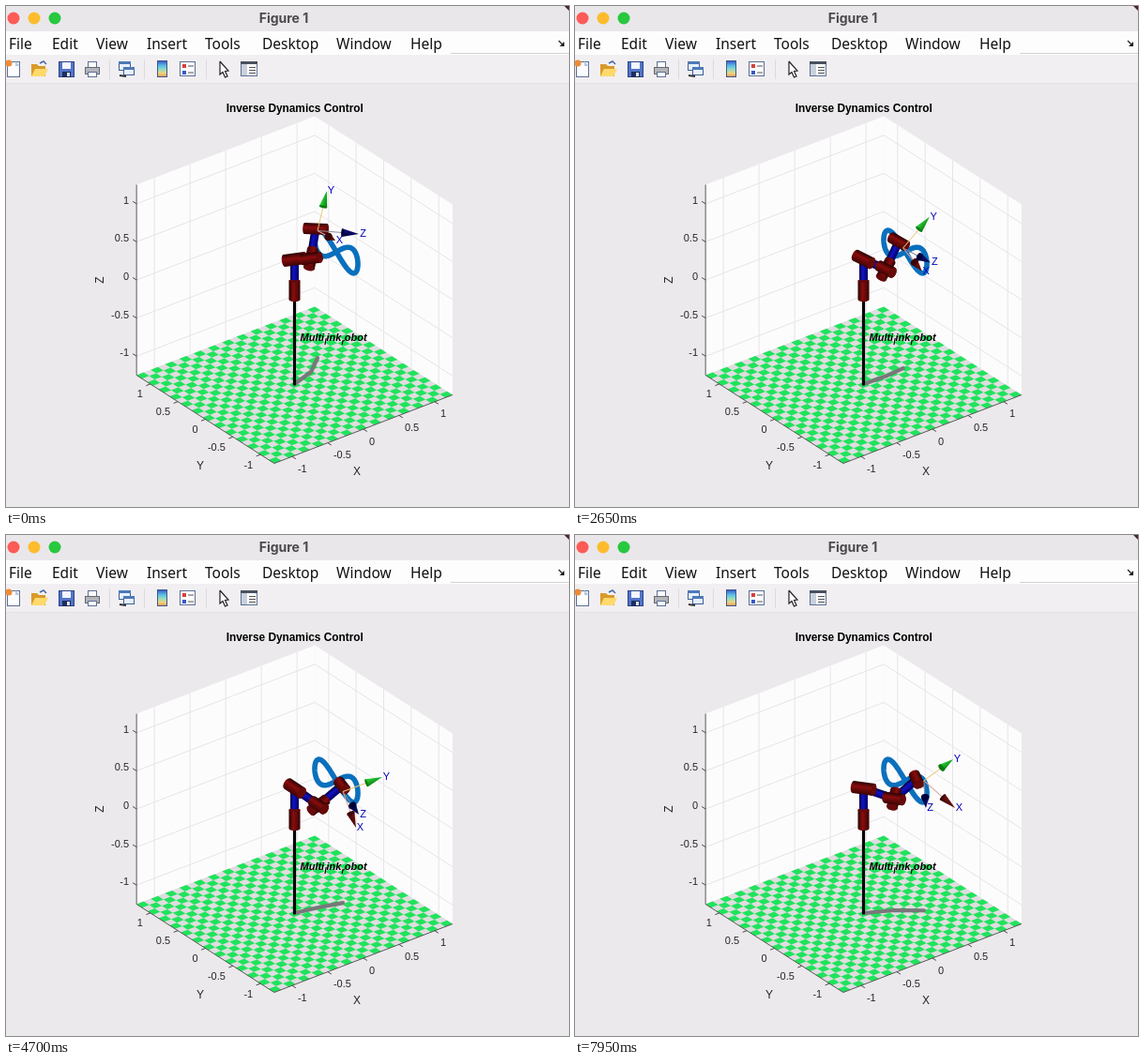
An HTML page with a canvas that plays this animation: 600x534 px, repeating every 8000 ms.

```html
<!DOCTYPE html>
<html lang="en">
<head>
<meta charset="utf-8">
<title>Figure 1</title>
<style>
html, body { margin: 0; width: 100%; height: 100%; overflow: hidden; background: #ebe9eb; }
canvas { display: block; }
</style>
</head>
<body>
<canvas id="stage" width="600" height="534"></canvas>
<script>
const W = 600, H = 534, LOOP = 8000, STEP = 50;
const stage = document.getElementById('stage').getContext('2d');
const backdrop = document.createElement('canvas');
backdrop.width = W;
backdrop.height = H;
const SANS = '"Liberation Sans", Arial, sans-serif';
const TICKS = [-1, -0.5, 0, 0.5, 1];
const LIMIT = 1.25;
let g = backdrop.getContext('2d');

// ---- drawing helpers ----
const add = (p, q, k = 1) => [p[0] + q[0] * k, p[1] + q[1] * k];
const project = (x, y, z) => [307.5 + 76 * x - 58.7 * y, 302.5 - 29.2 * x - 37.6 * y - 81.2 * z];

function trace(points) {
  g.beginPath();
  points.forEach(p => g.lineTo(...p));
}
function poly(points, color) {
  trace(points);
  g.closePath();
  g.fillStyle = color;
  g.fill();
}
function line(points, color, width = 1) {
  trace(points);
  g.strokeStyle = color;
  g.lineWidth = width;
  g.stroke();
}
function rect(x, y, w, h, fill, stroke) {
  g.fillStyle = fill;
  g.fillRect(x, y, w, h);
  if (stroke) {
    g.strokeStyle = stroke;
    g.lineWidth = 1;
    g.strokeRect(x + 0.5, y + 0.5, w - 1, h - 1);
  }
}
function disc(x, y, r, color) {
  g.beginPath();
  g.arc(x, y, r, 0, 7);
  g.fillStyle = color;
  g.fill();
}
function label(text, x, y, font, color = '#262626', align = 'center') {
  g.font = font;
  g.fillStyle = color;
  g.textAlign = align;
  g.textBaseline = 'alphabetic';
  g.fillText(text, x, y);
}

// ---- window chrome ----
function drawWindow() {
  rect(0, 0, W, H, '#ebe9eb');
  rect(0, 0, W, 27, '#eae7ea');
  poly([[595, 0], [600, 0], [600, 5]], '#4a2530');
  ['#fc5b57', '#fdbc2e', '#28c83f'].forEach((c, i) => disc(8 + 22 * i, 13, 6.5, c));
  label('Figure 1', 296, 18, '700 14px Inter, sans-serif', '#4b494c');
  rect(0, 27, W, 25, '#fefdfe');
  const menus = { File: 3, Edit: 49, View: 96, Insert: 150, Tools: 212, Desktop: 273, Window: 352, Help: 431 };
  for (const name in menus)
    label(name, menus[name], 46, '15.5px "Noto Sans", sans-serif', '#111', 'left');
  line([[474, 50.5], [600, 50.5]], '#d2d0d2');
  line([[589, 37], [594, 42]], '#222', 1.3);
  poly([[595, 38], [595, 43], [590, 43]], '#222');
  rect(0, 52, W, 30, '#f1eff1');
  line([[0, 82.5], [W, 82.5]], '#e3e1e3');
  drawToolbar();
}

function page(x, y, w, h) {
  rect(x, y, w, h, '#fdfdff', '#5c6f95');
}
function drawToolbar() {
  [110.5, 147.5, 213.5].forEach(x => line([[x, 57], [x, 78]], '#dcdadc'));
  // new
  page(1, 59, 14, 17);
  disc(3, 61, 3.5, '#ee8c35');
  poly([[10, 59], [15, 64], [10, 64]], '#b9c8e2');
  // open
  poly([[27, 62], [33, 62], [35, 64], [42, 64], [42, 75], [27, 75]], '#d99a2b');
  poly([[31, 67], [45, 67], [41, 75], [27, 75]], '#ffd96b');
  line([[36, 61], [40, 59], [43, 62]], '#4668a8', 1.5);
  // save
  rect(56, 59, 17, 17, '#5274c8', '#2b4285');
  rect(60, 60, 9, 7, '#f4f6ff');
  rect(60, 70, 9, 6, '#1d2d5c');
  rect(65, 71, 3, 4, '#dde3f5');
  // print
  page(87, 59, 10, 8);
  rect(84, 65, 16, 8, '#b4b5bb', '#66686f');
  page(87, 70, 10, 6);
  // link
  rect(120, 59, 13, 10, '#e8f0ff', '#3d5f95');
  rect(120, 59, 13, 3, '#4d79b8');
  rect(125, 65, 12, 9, '#e8f0ff', '#3d5f95');
  rect(125, 65, 12, 3, '#4d79b8');
  line([[121, 74], [128, 75]], '#333', 2);
  // colorbar
  const bar = g.createLinearGradient(0, 59, 0, 76);
  ['#3a5bc7', '#57b7e8', '#8fdcc5', '#f0d47a', '#e98a55'].forEach((c, i) => bar.addColorStop(i / 4, c));
  rect(161, 58, 11, 18, bar, '#405888');
  // legend
  page(185, 59, 17, 16);
  rect(188, 62, 4, 4, '#d8403a');
  rect(188, 69, 4, 4, '#3a58c8');
  line([[194, 64], [200, 64]], '#555');
  line([[194, 71], [200, 71]], '#555');
  // pointer
  const arrow = [[228, 59], [228, 73], [231, 70.5], [233.5, 76], [236, 75], [233.5, 69.5], [237, 69]];
  poly(arrow, '#fff');
  line([...arrow, arrow[0]], '#222', 1.2);
  // inspector
  page(250, 59, 18, 16);
  rect(250, 59, 18, 3, '#49505f');
  rect(251, 62, 6, 12, '#c9d0dc');
  [65, 68, 71].forEach(y => line([[259, y + 0.5], [266, y + 0.5]], '#555'));
}

// ---- axes ----
function drawAxes() {
  const L = LIMIT, cells = 25, size = 2 * L / cells;
  poly([project(-L, L, -L), project(-L, L, L), project(L, L, L), project(L, L, -L)], '#fdfcfd');
  poly([project(L, -L, -L), project(L, -L, L), project(L, L, L), project(L, L, -L)], '#fdfcfd');
  for (const v of TICKS) {
    line([project(v, L, -L), project(v, L, L)], '#e6e4e7');
    line([project(L, v, -L), project(L, v, L)], '#e6e4e7');
    line([project(-L, L, v), project(L, L, v), project(L, -L, v)], '#e6e4e7');
  }
  poly([project(-L, -L, -L), project(L, -L, -L), project(L, L, -L), project(-L, L, -L)], '#dfdddf');
  for (let i = 0; i < cells; i++)
    for (let j = i % 2; j < cells; j += 2) {
      const x = -L + i * size, y = -L + j * size;
      poly([project(x, y, -L), project(x + size, y, -L), project(x + size, y + size, -L), project(x, y + size, -L)], '#20e35c');
    }
  line([project(-L, L, L), project(-L, L, -L), project(-L, -L, -L), project(L, -L, -L)], '#5a585a');

  const font = '11px ' + SANS;
  for (const v of TICKS) {
    const px = project(v, -L, -L), py = project(-L, v, -L), pz = project(-L, L, v);
    line([px, add(px, [4, 2.5])], '#4a484a');
    line([py, add(py, [-4.5, 1.7])], '#4a484a');
    line([pz, add(pz, [-4, -2.5])], '#4a484a');
    label(v, px[0] + 6, px[1] + 16.5, font, '#262626', 'left');
    label(v, py[0] - 8, py[1] + 14.5, font, '#262626', 'right');
    label(v, 131, pz[1], font, '#262626', 'right');
  }
  const axisFont = '12px ' + SANS;
  label('X', 374, 500, axisFont);
  label('Y', 207, 494, axisFont);
  g.save();
  g.translate(104, 292);
  g.rotate(-Math.PI / 2);
  label('Z', 0, 0, axisFont);
  g.restore();
  label('Inverse Dynamics Control', 307.7, 113, 'bold 11.85px ' + SANS, '#000');
}

// ---- motion tracks, one entry per time ----
const times = [0, 1850, 3450, 4700, 5600, 6850, 7950];
const tracks = {
  phase: [[1.05], [0.29], [-0.04], [-0.31], [-0.6], [-1.2], [-2.1]],
  pitchAxis: [[11, -1.5], [9, 3], [8, 5], [7.5, 5], [8.5, 4], [10, 2.5], [11, 1.5]],
  elbow: [[325, 269], [331, 276], [331, 285], [333, 288], [334, 289], [339, 284], [340, 281]],
  rollAxis: [[-2, 10], [-4, 10], [-6, 8], [-8, 6], [-8, 5], [-4, 8], [-2, 9]],
  wrist: [[330, 237.5], [341, 246], [349, 257], [358, 267], [363, 272.5], [368.5, 273], [364, 260.5]],
  wristAxis: [[12, 0.5], [9, 3.5], [6.5, 5], [3.5, 4.5], [3, 5], [0.5, 6], [2.5, 5.5]],
  tipX: [[351, 250], [367, 271], [371, 295], [373, 312], [380, 318], [398, 311], [405, 291]],
  tipY: [[342, 197], [368, 213], [387, 238], [401, 258], [409, 267], [412, 260], [403, 239]],
  tipZ: [[376, 243], [379, 264], [378, 283], [376, 298], [374, 306], [374, 305], [374, 291]],
  shadowY: [[390], [394], [395], [397], [398], [401], [400]]
};

function slope(values, i, d) {
  const a = Math.max(i - 1, 0), b = Math.min(i + 1, times.length - 1);
  return (values[b][d] - values[a][d]) / (times[b] - times[a]);
}
// Cubic Hermite through the track values
function sample(values, t) {
  const i = Math.max(0, Math.min(times.length - 2, times.findIndex(v => v > t) - 1 + (t >= times.at(-1)) * 99));
  const span = times[i + 1] - times[i], u = (t - times[i]) / span, e = u * u * (3 - 2 * u);
  return values[0].map((_, d) =>
    values[i][d] * (1 - e) + values[i + 1][d] * e +
    span * u * (1 - u) * ((1 - u) * slope(values, i, d) - u * slope(values, i + 1, d)));
}

// ---- robot ----
const curvePoint = a => [352 - 23 * Math.sin(a), 262 - 13 * Math.sin(a) - 13 * Math.sin(2 * a)];
const RED = ['#260202', '#8a0d0d', '#3a0404', '#650909'];
const BLUE = ['#00003c', '#1212c4', '#000064', '#08087c'];

// Cylinder from a to b; squash sets how open its visible end looks
function cylinder(a, b, r, colors, squash) {
  const angle = Math.atan2(b[1] - a[1], b[0] - a[0]), len = Math.hypot(b[0] - a[0], b[1] - a[1]);
  g.save();
  g.translate(...a);
  g.rotate(angle);
  const shade = g.createLinearGradient(0, -r, 0, r);
  [0, 2, 1].forEach((k, i) => shade.addColorStop([0, 1, 0.4][i], colors[k]));
  const cap = r * squash;
  g.beginPath();
  g.ellipse(0, 0, cap, r, 0, Math.PI / 2, Math.PI * 1.5);
  g.ellipse(len, 0, cap, r, 0, -Math.PI / 2, Math.PI / 2);
  g.fillStyle = shade;
  g.fill();
  g.beginPath();
  g.ellipse(len, 0, cap, r, 0, 0, 7);
  g.fillStyle = colors[3];
  g.fill();
  g.restore();
}
function joint(center, half, r = 6) {
  const open = Math.sqrt(Math.max(0.06, 1 - (Math.hypot(...half) / 13) ** 2));
  cylinder(add(center, half, -1), add(center, half), r, RED, open * 0.8);
}

function frameArrow(name, origin, tip, shaft, light, dark) {
  const dx = tip[0] - origin[0], dy = tip[1] - origin[1], len = Math.hypot(dx, dy);
  const open = Math.sqrt(Math.max(0.08, 1 - (len / 46) ** 2)), base = len * 0.6, r = 4.3;
  g.save();
  g.translate(...origin);
  g.rotate(Math.atan2(dy, dx));
  line([[0, 0], [base, 0]], shaft, 1);
  const shade = g.createLinearGradient(0, -r, 0, r);
  shade.addColorStop(0, light);
  shade.addColorStop(1, dark);
  poly([[base, -r], [len, 0], [base, r]], shade);
  g.beginPath();
  g.ellipse(base, 0, r * open, r, 0, 0, 7);
  g.fillStyle = dark;
  g.fill();
  g.restore();
  label(name, tip[0] + 4.5, tip[1] + 3, '11px ' + SANS, '#0000b8');
}

function drawName() {
  let x = 313.5;
  for (const [text, size, drop] of [['Multi', 11, 0], ['l', 8.5, 4], ['ink', 11, 0], ['r', 8.5, 4], ['obot', 11, 0]]) {
    label(text, x, 357 + drop, `italic bold ${size}px ${SANS}`, '#000', 'left');
    x += g.measureText(text).width;
  }
}

function drawRobot(t) {
  const pose = {};
  for (const key in tracks) pose[key] = sample(tracks[key], t);
  const tool = curvePoint(pose.phase[0]);
  const shoulder = [307.5, 270], { elbow, wrist } = pose;

  g.lineCap = g.lineJoin = 'round';
  line([[307.5, 403], [elbow[0], pose.shadowY[0]], [tool[0], 375 + (tool[0] - 332) * 0.634]], '#797779', 4.2);
  line([[307.5, 403], [307.5, 314]], '#000', 3.2);
  drawName();
  const curve = Array.from({ length: 121 }, (_, i) => curvePoint(i * Math.PI / 60));
  line(curve, '#0a70bd', 5.6);
  g.lineCap = 'butt';

  cylinder([307.5, 313], [307.5, 293], 6, RED, 0.35);
  cylinder([307.5, 291], shoulder, 4.5, BLUE, 0.3);
  cylinder(shoulder, elbow, 4.5, BLUE, 0.3);
  joint(shoulder, pose.pitchAxis, 6.5);
  cylinder(elbow, wrist, 4.5, BLUE, 0.3);
  joint(elbow, pose.rollAxis);
  joint(elbow, pose.pitchAxis.map(v => v * 0.85));
  joint(wrist, pose.wristAxis);

  frameArrow('X', tool, pose.tipX, '#d8a29a', '#7c1414', '#3c0606');
  frameArrow('Z', tool, pose.tipZ, '#8c8c9c', '#14147c', '#00003a');
  frameArrow('Y', tool, pose.tipY, '#e8c878', '#2ddc38', '#0a7a14');
}

drawWindow();
drawAxes();
g = stage;

const start = performance.now();
function render() {
  const elapsed = (performance.now() - start) % LOOP;
  g.drawImage(backdrop, 0, 0);
  drawRobot(Math.floor(elapsed / STEP) * STEP);
  requestAnimationFrame(render);
}
render();
</script>
</body>
</html>
```
